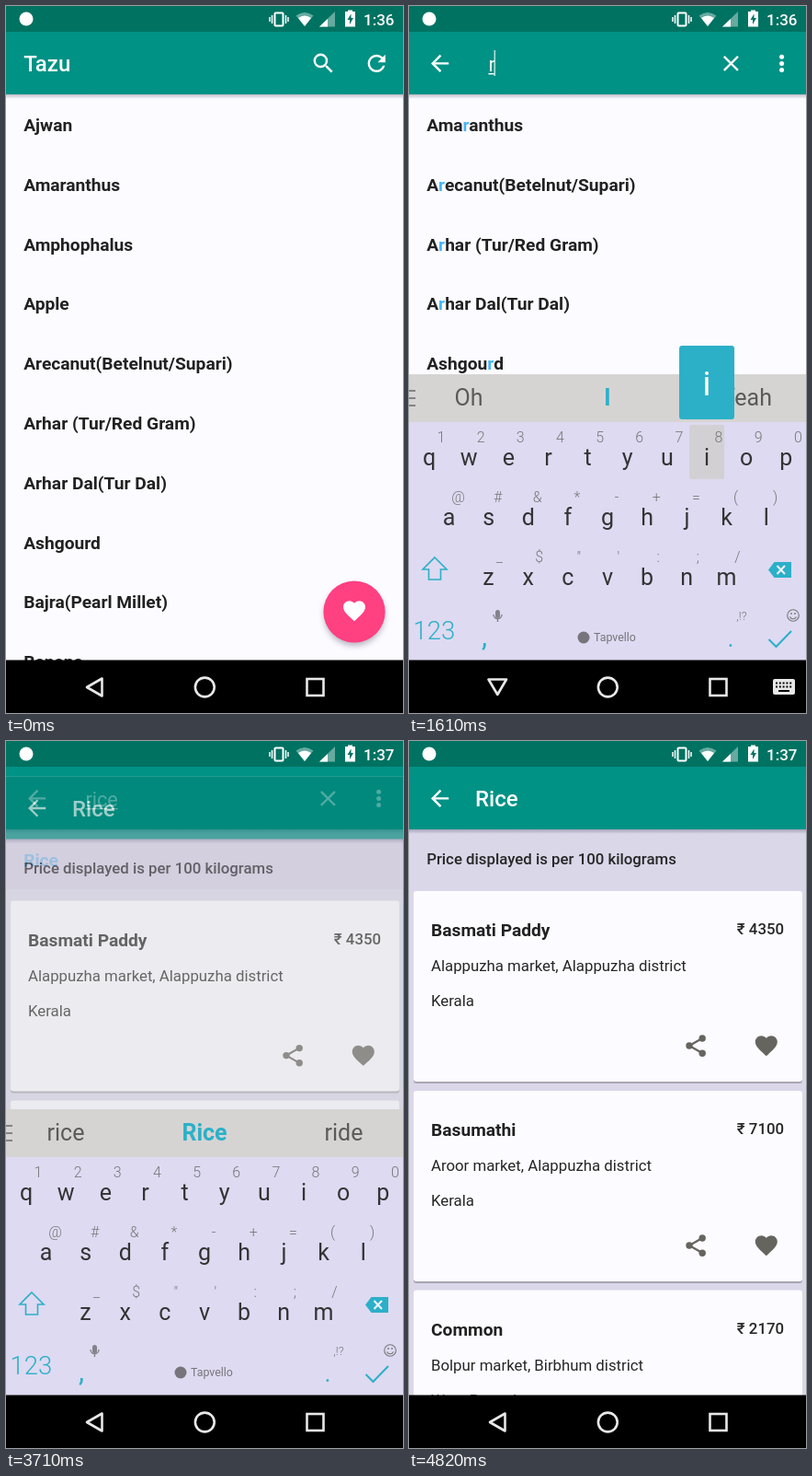
Recreate the animation shown at these times as an HTML page. Size 432 px wide and 768 px high, loop 4.94 s.

```html
<!DOCTYPE html>
<html lang="en">
<head>
<meta charset="utf-8">
<title>Commodity search</title>
<style>
html, body { margin: 0; width: 100%; height: 100%; overflow: hidden; background: #000; }
svg { display: block; width: 432px; height: 768px; font-family: Roboto, "Noto Sans", sans-serif; }
text { white-space: pre; }
.item { font-size: 19.2px; font-weight: 700; fill: #212121; }
.body { font-size: 16.8px; fill: #262626; }
.strong { font-weight: 500; }
.title { font-size: 24px; font-weight: 500; fill: #fff; }
.query { font-size: 21.6px; fill: #fff; }
.key { font-size: 25px; fill: #333; text-anchor: middle; }
.alt { font-size: 16px; font-weight: 300; fill: #777; text-anchor: middle; }
.guess { font-size: 25px; fill: #5b5a5a; text-anchor: middle; }
.best { font-weight: 700; fill: #2bb0c8; }
</style>
</head>
<body>
<svg id="stage" viewBox="0 0 432 768">
  <defs>
    <linearGradient id="shade" x2="0" y2="1">
      <stop stop-color="#3c3658" stop-opacity=".32"/>
      <stop offset="1" stop-color="#3c3658" stop-opacity="0"/>
    </linearGradient>
    <filter id="blur" x="-30%" y="-30%" width="160%" height="160%"><feGaussianBlur stdDeviation="3"/></filter>
    <clipPath id="rowClip"><rect y="96" width="432" height="65"/></clipPath>
  </defs>
</svg>
<script>
const LOOP = 4940;
const TEAL = '#009285', ACCENT = '#2bb0c8';
const stage = document.getElementById('stage');

const ICON = {
  search: 'M15.5 14h-.79l-.28-.27A6.47 6.47 0 0 0 16 9.5 6.5 6.5 0 1 0 9.5 16c1.61 0 3.09-.59 4.23-1.57l.27.28v.79l5 4.99L20.49 19zm-6 0a4.5 4.5 0 1 1 0-9 4.5 4.5 0 0 1 0 9z',
  refresh: 'M17.65 6.35A7.96 7.96 0 0 0 12 4a8 8 0 1 0 7.73 10h-2.08A6 6 0 1 1 12 6c1.66 0 3.14.69 4.22 1.78L13 11h7V4z',
  back: 'M20 11H7.83l5.59-5.59L12 4l-8 8 8 8 1.41-1.41L7.83 13H20z',
  close: 'M19 6.41L17.59 5 12 10.59 6.41 5 5 6.41 10.59 12 5 17.59 6.41 19 12 13.41 17.59 19 19 17.59 13.41 12z',
  heart: 'M12 21.35l-1.45-1.32C5.4 15.36 2 12.28 2 8.5 2 5.42 4.42 3 7.5 3c1.74 0 3.41.81 4.5 2.09C13.09 3.81 14.76 3 16.5 3 19.58 3 22 5.42 22 8.5c0 3.78-3.4 6.86-8.55 11.54z'
};

// Markup helpers
const text = (x, y, cls, s, more = '') => `<text x="${x}" y="${y}" class="${cls}" ${more}>${s}</text>`;
const rect = (x, y, w, h, fill, more = '') => `<rect x="${x}" y="${y}" width="${w}" height="${h}" fill="${fill}" ${more}/>`;
const circle = (x, y, r, fill, more = '') => `<circle cx="${x}" cy="${y}" r="${r}" fill="${fill}" ${more}/>`;
const line = (d, color, w, more = '') => `<path d="${d}" fill="none" stroke="${color}" stroke-width="${w}" ${more}/>`;
const icon = (name, cx, cy, fill = '#fff') =>
  `<path d="${ICON[name]}" fill="${fill}" transform="translate(${cx - 14.4} ${cy - 14.4}) scale(1.2)"/>`;

function layer(markup) {
  const g = document.createElementNS('http://www.w3.org/2000/svg', 'g');
  g.innerHTML = markup;
  stage.append(g);
  return g;
}
const find = id => document.getElementById(id);
const show = (el, on) => el.setAttribute('display', on ? 'inline' : 'none');
function fill(el, markup) {
  if (el.cache !== markup) el.innerHTML = el.cache = markup;
}
function place(el, dy, alpha) {
  el.setAttribute('transform', `translate(0 ${dy.toFixed(2)})`);
  el.setAttribute('opacity', alpha.toFixed(3));
  show(el, alpha > 0);
}
const span = (t, a, b) => Math.min(1, Math.max(0, (t - a) / (b - a)));
const easeOut = p => 1 - (1 - p) ** 2.5;

const bar = rect(0, 28, 432, 68, TEAL) + rect(0, 96, 432, 5, 'url(#shade)');

// Commodity list
const crops = {
  '': ['Ajwan', 'Amaranthus', 'Amphophalus', 'Apple', 'Arecanut(Betelnut/Supari)', 'Arhar (Tur/Red Gram)',
    'Arhar Dal(Tur Dal)', 'Ashgourd', 'Bajra(Pearl Millet)', 'Banana'],
  r: ['Amaranthus', 'Arecanut(Betelnut/Supari)', 'Arhar (Tur/Red Gram)', 'Arhar Dal(Tur Dal)', 'Ashgourd'],
  ri: ['Brinjal', 'Rice', 'Turmeric'],
  ric: ['Rice', 'Turmeric'],
  rice: ['Rice']
};
function listMarkup(query) {
  return crops[query].map((name, i) => {
    const at = name.toLowerCase().indexOf(query), end = at + query.length;
    const label = query
      ? `${name.slice(0, at)}<tspan fill="#45b5f9">${name.slice(at, end)}</tspan>${name.slice(end)}`
      : name;
    return text(19.2, 136 + i * 64.8, 'item', label);
  }).join('');
}

layer(rect(0, 96, 432, 615, '#fcfbff') +
  '<g clip-path="url(#rowClip)"><circle id="rowRipple" cy="143" fill="#f0e8f8"/></g><g id="list"></g>' +
  circle(379, 662, 33, '#554a66', 'opacity=".4" filter="url(#blur)"') +
  circle(379, 658, 33.6, '#ff4081') + icon('heart', 379, 657));
layer(bar);
const home = layer(text(19.2, 71, 'title', 'Tazu') +
  circle(345, 62, 0, '#fff', 'id="tapRipple"') + icon('search', 345.4, 62.4) + icon('refresh', 403.2, 62.4));
const searchBar = layer(icon('back', 33.6, 62.4) +
  text(86.4, 70.5, 'query', 'Search Commodities', 'id="hint" opacity=".52"') +
  text(86.4, 70.5, 'query', '', 'id="query"') +
  rect(86.4, 73, 0, 1.4, '#fff', 'id="underline"') + rect(0, 48, 1.5, 28, '#b9e3df', 'id="cursor"') +
  `<g id="clear">${icon('close', 350.4, 62.4)}</g>` +
  [55.2, 62.4, 69.6].map(y => circle(405.6, y, 2.5, '#fff')).join(''));

// Price cards
function card(y, name, price, market, state) {
  return rect(5, y + 2, 423, 207, '#8f8a96', 'rx="3" opacity=".65"') + rect(5, y, 423, 207, '#fcfbff', 'rx="3"') +
    text(24, y + 49, 'item', name) + text(408, y + 47, 'body strong', '₹ ' + price, 'text-anchor="end"') +
    text(24, y + 87, 'body', market) + text(24, y + 125, 'body', state) +
    line(`M319 ${y + 160}L305 ${y + 168}L319 ${y + 176}`, '#66645f', 2.2) +
    [[319.2, 160], [305, 168], [319.2, 176.2]].map(p => circle(p[0], y + p[1], 3.7, '#66645f')).join('') +
    icon('heart', 388.8, y + 168, '#66645f');
}
const detail = layer(rect(0, 28, 432, 740, '#dad7e9') +
  text(19.2, 133.5, 'body strong', 'Price displayed is per 100 kilograms') +
  card(163, 'Basmati Paddy', 4350, 'Alappuzha market, Alappuzha district', 'Kerala') +
  card(380, 'Basumathi', 7100, 'Aroor market, Alappuzha district', 'Kerala') +
  card(596.5, 'Common', 2170, 'Bolpur market, Birbhum district', 'West Bengal') +
  bar + icon('back', 33.6, 62.4) + text(72, 71, 'title', 'Rice') +
  rect(0, 28, 432, 740, '#000', 'id="dim"'));

// Keyboard
const rows = [
  ['qwertyuiop', '1234567890', 22, 499, 13],
  ['asdfghjkl', '@#&amp;*-+=()', 43.5, 564, 10],
  ['zxcvbnm', '_$"\':;/', 86.5, 629, 12]
];
const keySpot = {};
const keysMarkup = rows.map(([keys, alts, x0, y, dx]) => {
  const marks = alts.replace('&amp;', '&');
  return [...keys].map((k, i) => {
    const x = x0 + i * 43.15;
    keySpot[k] = [x, y];
    return text(x, y, 'key', k) + text(x + dx, y - 25, 'alt', marks[i].replace('&', '&amp;'));
  }).join('');
}).join('');

const keyboard = layer(rect(0, 400, 432, 311, '#dedaf1') + rect(0, 400, 432, 52, '#d6d4d3') +
  [418, 426, 434].map(y => rect(0, y - 1, 7, 2, '#858383')).join('') + '<g id="guesses"></g>' +
  rect(0, 455, 38, 59, '#d2d0d3', 'id="pressed" rx="2"') + keysMarkup +
  line('M28 599L41 612H34.5V623H21.5V612H15Z', ACCENT, 1.6) +
  `<path d="M391 612.5L397.5 604H416V621H397.5Z" fill="${ACCENT}"/>` +
  line('M400.5 608L409 617M409 608L400.5 617', '#f4f2ff', 2) +
  text(4.5, 688, '', '123', `font-size="27.5" font-weight="300" fill="${ACCENT}"`) +
  text(79, 695, '', ',', `font-size="31" fill="${ACCENT}"`) +
  rect(94, 656, 5, 9, '#85828a', 'rx="2.5"') + line('M92 661a4.5 4.5 0 0 0 9 0M96.5 666v3', '#85828a', 1.4) +
  circle(190, 686, 6.5, '#77757b') + text(201, 690, '', 'Tapvello', 'font-size="12.4" fill="#77757b"') +
  text(362, 667, 'alt', ',!?', 'style="font-size:13px"') +
  text(350, 696, 'key', '.', `style="fill:${ACCENT}"`) +
  circle(418, 662, 6.3, 'none', 'stroke="#777" stroke-width="1.1"') +
  circle(416, 660, 0.9, '#777') + circle(420, 660, 0.9, '#777') + line('M414.5 663.5a3.8 3.8 0 0 0 7 0', '#777', 1.1) +
  line('M391.5 688L399.5 696L416 679', ACCENT, 2) +
  `<g id="popup">${rect(-30, -130, 60, 80, ACCENT, 'rx="3"')}` +
  text(0, -76, '', '', 'id="popKey" font-size="37" fill="#fff" text-anchor="middle"') + '</g>');

// Status and navigation bars
layer(rect(0, 0, 432, 28, '#007262') + circle(22, 14, 7.5, '#fff') +
  rect(292.5, 7.5, 9, 14, 'none', 'stroke="#fff" stroke-width="2" rx="1"') +
  line('M289.5 10v9M304.5 10v9M287 12v5M307 12v5', '#fff', 1.5) +
  '<path d="M315.5 10.5Q325 3.5 334.5 10.5L325 22Z" fill="#fff" opacity=".4"/>' +
  '<path d="M318 13Q325 8 332 13L325 22Z" fill="#fff"/>' +
  '<path d="M358 6V22.5H341Z" fill="#fff" opacity=".4"/><path d="M350 14V22.5H341Z" fill="#fff"/>' +
  '<path d="M369 6H372V4.500H377V6H380V22.500H369Z" fill="#fff"/>' +
  '<path d="M375.500 8.500L371.500 15H374V20L378 13H375.500Z" fill="#007262"/>' +
  text(389, 20.5, '', '', 'id="clock" font-size="17" font-weight="500" fill="#fff"'));
layer(rect(0, 710.5, 432, 57.5, '#000') + line('', '#e8e8e8', 2.6, 'id="back" stroke-linejoin="round"') +
  circle(216.3, 740, 10.4, 'none', 'stroke="#e8e8e8" stroke-width="2.6"') +
  rect(327.5, 731, 18, 18, 'none', 'stroke="#e8e8e8" stroke-width="2.6"') +
  '<g id="switcher">' + rect(396, 731, 24, 17, '#e8e8e8', 'rx="2"') +
  line('M399 735.5H418M399 739.5H418', '#000', 2, 'stroke-dasharray="2 1.8"') + rect(402, 743, 12, 2, '#000') + '</g>');

const ui = {};
for (const id of ['rowRipple', 'list', 'tapRipple', 'hint', 'query', 'underline', 'cursor', 'clear', 'dim',
  'guesses', 'pressed', 'popup', 'popKey', 'clock', 'back', 'switcher']) ui[id] = find(id);

// Key, press time, release time
const taps = [['r', 1330, 1450], ['i', 1580, 1700], ['c', 1800, 1910], ['e', 1970, 2050]];
const typed = t => taps.filter(k => t >= k[2]).map(k => k[0]).join('');
const guesses = {
  '': ['Oh', 'I', 'Yeah'], r: ['r', 'R', 'are'], ri: ['ri', 'Ri', 'right'],
  ric: ['ric', 'Rich', 'rich'], rice: ['rice', 'Rice', 'ride']
};

function draw(t) {
  const searching = t >= 390, word = typed(t);

  show(home, !searching);
  show(searchBar, searching);
  const tap = span(t, 170, 390);
  ui.tapRipple.setAttribute('r', 29 * easeOut(tap));
  ui.tapRipple.setAttribute('opacity', tap ? 0.22 : 0);

  fill(ui.list, listMarkup(typed(t - 90)));
  ui.rowRipple.setAttribute('cx', 130 + 86 * span(t, 3380, 3620));
  ui.rowRipple.setAttribute('r', t < 3380 ? 0 : Math.min(420, (t - 3380) * 2.02));

  show(ui.hint, !word);
  show(ui.clear, word);
  fill(ui.query, word);
  const width = word ? ui.query.getComputedTextLength() : 0;
  ui.underline.setAttribute('width', width);
  ui.cursor.setAttribute('x', 86 + width - (word ? 0.8 : 0));
  show(ui.cursor, (t >= 1110 && t < 2550) || (t >= 3050 && t < 3550));

  const open = easeOut(span(t, 3560, 3860));
  place(detail, 61 * (1 - open), span(t, 3560, 3780));
  ui.dim.setAttribute('opacity', 0.09 * (1 - span(t, 3880, 4040)));

  const rise = span(t, 480, 720), fall = span(t, 3930, 4150);
  place(keyboard, 31 * (1 - easeOut(rise)) + 31 * fall * fall, Math.min(rise, 1 - fall));
  fill(ui.guesses, guesses[typed(t - 170)].map((s, i) =>
    text([65, 216, 367.5][i], 434, i === 1 ? 'guess best' : 'guess', s)
  ).join(''));

  const press = taps.find(k => t >= k[1] && t < k[2]);
  show(ui.pressed, press);
  show(ui.popup, press);
  if (press) {
    const [x, y] = keySpot[press[0]];
    ui.pressed.setAttribute('x', x - 19);
    ui.pressed.setAttribute('y', y - 44);
    ui.popup.setAttribute('transform', `translate(${x} ${y})`);
    fill(ui.popKey, press[0]);
  }

  fill(ui.clock, t < 2830 ? '1:36' : '1:37');
  const typing = t >= 500 && t < 3700;
  ui.back.setAttribute('d', typing ? 'M86.5 731.500H106L96.300 748Z' : 'M104.500 730.500V749.500L88 740Z');
  show(ui.switcher, typing);
}

const start = performance.now();
function tick() {
  draw((performance.now() - start) % LOOP);
  requestAnimationFrame(tick);
}
tick();
</script>
</body>
</html>
```
